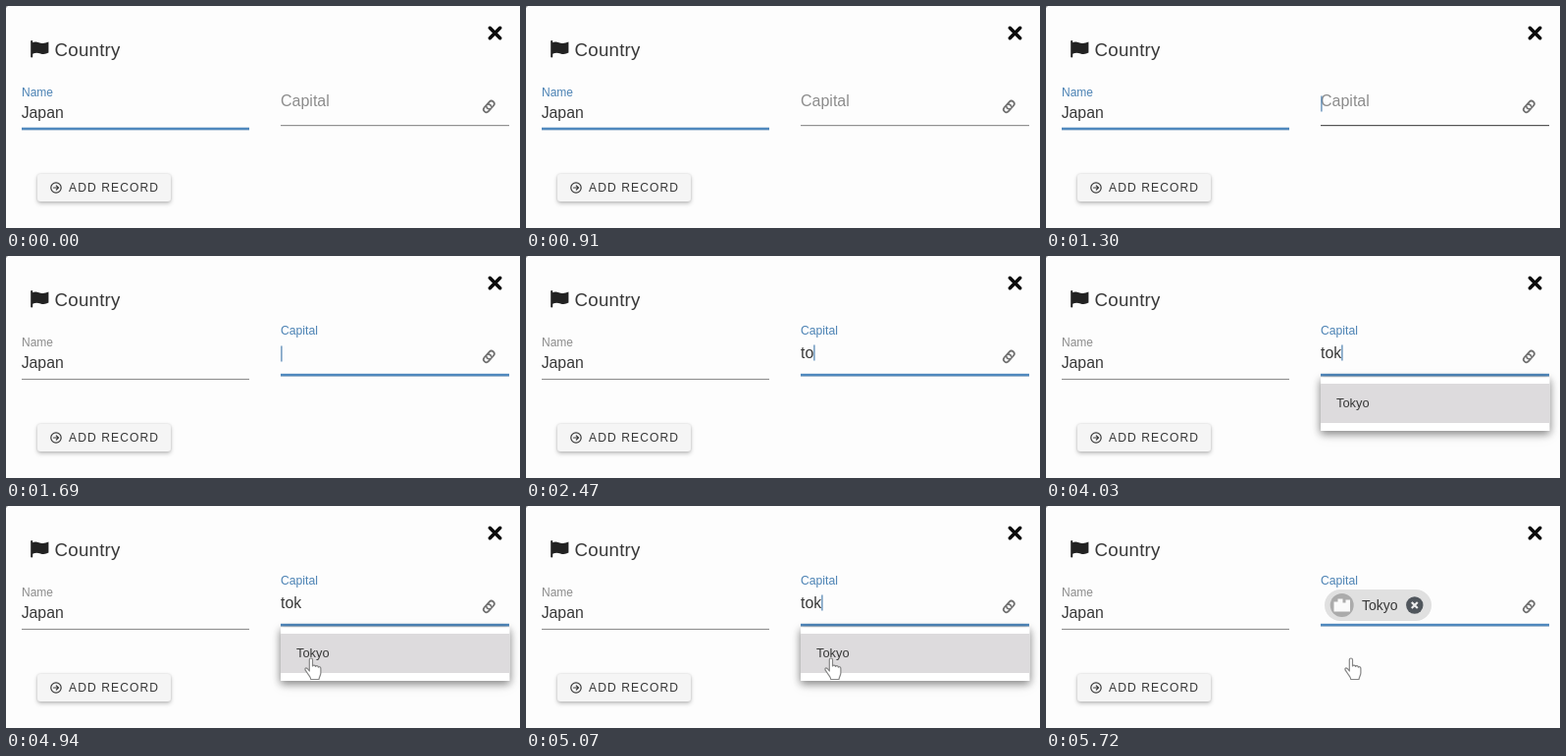
These frames come from a looping animation (524x226 px, 6.37 s). An HTML page:

```html
<!DOCTYPE html>
<html lang="en">
<head>
<meta charset="utf-8">
<title>Country form</title>
<style>
html, body { margin: 0; width: 100%; height: 100%; overflow: hidden; background: #fdfdfd; }
svg { display: block; width: 524px; height: 226px; font-family: "Liberation Sans", Arial, sans-serif; }
text { fill: #383838; white-space: pre; }
.soft { filter: blur(.4px); }
.button { filter: drop-shadow(0 2px 2px rgba(0, 0, 0, .24)) drop-shadow(0 0 1px rgba(0, 0, 0, .12)); }
.menu { filter: drop-shadow(0 3px 4px rgba(0, 0, 0, .4)) drop-shadow(0 2px 5px rgba(0, 0, 0, .15)); }
.line { fill: none; stroke-linecap: round; stroke-linejoin: round; }
</style>
</head>
<body>
<svg viewBox="0 0 524 226">
<g class="soft">
  <path d="M0 0h2l-2 2z" fill="#999"/>

  <path d="M493.3 22.3l10.4 10.4M503.7 22.3l-10.4 10.4" stroke="#0b0b0b" stroke-width="3.6" stroke-linecap="round"/>

  <path d="M26.2 36v15.5" class="line" stroke="#222" stroke-width="2"/>
  <path d="M27 37.3c4-2.4 7 .9 10.4 .6 2.2-.1 4-.8 6-1.5v11.2c-2.6 1.5-5.4 1.9-8.2 .9-3-1-5.200-1-8.200 .2z" fill="#222"/>
  <text x="49.5" y="50.8" font-size="18.7" letter-spacing=".25">Country</text>

  <text id="nameLabel" x="16" y="92" font-size="12">Name</text>
  <text x="15.7" y="113.6" font-size="15.8">Japan</text>
  <rect x="16" y="124.9" width="232" height="1.2" fill="#929292"/>
  <rect id="nameFocus" x="16" y="123.7" width="232" height="2.6" fill="#4f88bd"/>

  <text id="capitalLabel" font-size="16">Capital</text>
  <text id="typed" x="280" y="103.6" font-size="15.8"></text>
  <rect id="capitalLine" x="280" y="121" width="233" height="1.2"/>
  <rect id="capitalFocus" y="119.8" height="2.6" fill="#4f88bd"/>
  <g class="line" stroke="#707070" stroke-width="1.7" transform="translate(492.3 102.4) rotate(-48)">
    <path d="M-.8 2.900h-3a2.900 2.900 0 0 1 0-5.800h3.300a2.900 2.900 0 0 1 2.300 4.500"/>
    <path d="M.8-2.900h3a2.900 2.900 0 0 1 0 5.800h-3.300a2.900 2.900 0 0 1-2.300-4.500"/>
  </g>
  <rect id="caret" width="1.2" height="16" fill="#4a7fae"/>

  <rect class="button" x="32" y="171" width="136" height="28" rx="3" fill="#f5f5f5"/>
  <g class="line" stroke="#3a3a3a" stroke-width="1.2">
    <circle cx="51" cy="185" r="5.2"/>
    <path d="M48.5 185h4.8M51.3 182.800l2.200 2.200-2.200 2.200"/>
  </g>
  <text x="64" y="189.3" font-size="12.1" letter-spacing="1.08">ADD RECORD</text>

  <g id="menu">
    <rect class="menu" x="280" y="123.5" width="233.5" height="54.500" fill="#fff"/>
    <rect x="280" y="130" width="233.5" height="40" fill="#dddbdd"/>
    <text x="296" y="154.2" font-size="12.9">Tokyo</text>
  </g>

  <g id="chip">
    <rect x="284" y="85" width="109" height="32" rx="16" fill="#e0e0e0"/>
    <circle cx="301.7" cy="101" r="12" fill="#ababab"/>
    <path d="M293.5 107.500v-10h4v-3h5v4h3v-3h4.500v12z" fill="#fafafa"/>
    <text x="322" y="106" font-size="14">Tokyo</text>
    <circle cx="375.8" cy="101" r="8.7" fill="#50565c"/>
    <path d="M372.8 98l6 6M378.8 98l-6 6" stroke="#eee" stroke-width="2.2"/>
  </g>

  <path id="hand" class="line" stroke="#858585" stroke-width="1.2" style="fill:#fff"
    d="M-1.700 13V1.500C-1.700-.5 1.500-.5 1.500 1.500V8c.5-1.300 2.700-1.200 3 .4 .6-1.200 2.700-.9 2.900 .7 .7-1 2.500-.5 2.500 1.300V15c0 2.500-1.700 3.700-1.900 6.500H-.200c-.2-2.700-2.600-4.300-4.100-7.200-1.200-1.700-2.500-3-1.600-4 1.100-1.200 3 .6 4.200 2.700z"/>
</g>
</svg>
<script>
const LOOP = 6370;
const BLUE = "#4b82b4", GREY = "#8c8c8c";
const el = id => document.getElementById(id);

// Each step changes only the listed values: focus 0..1, typed text, caret [x, y], pointer [x, y].
const steps = [
  [0, { focus: 0, hover: false, typed: "", caret: null, menu: false, chip: false, pointer: null }],
  [260, { caret: [60, 101] }],
  [910, { caret: null }],
  [1170, { hover: true }],
  [1300, { caret: [280.3, 91.5] }],
  [1430, { focus: .8 }],
  [1560, { focus: .97 }],
  [1690, { focus: 1 }],
  [1950, { caret: null }],
  [2340, { typed: "t", caret: [285, 90.5] }],
  [2470, { typed: "to", caret: [293.3, 90.5] }],
  [2600, { menu: true }],
  [2860, { typed: "tok", caret: [301.3, 90.5] }],
  [3510, { caret: null }],
  [4030, { caret: [301.3, 90.5] }],
  [4550, { caret: null }],
  [4680, { pointer: [317, 141] }],
  [4810, { pointer: [313, 151] }],
  [4940, { pointer: [311, 155] }],
  [5070, { caret: [301.3, 90.5] }],
  [5200, { typed: "", caret: null, menu: false, chip: true }]
];

const mix = (a, b, p) => a + (b - a) * p;
const show = (id, on) => { el(id).style.display = on ? "" : "none"; };
const place = (id, pos) => {
  show(id, pos);
  if (pos) el(id).setAttribute("transform", `translate(${pos})`);
};

function render(time) {
  const s = Object.assign({}, ...steps.filter(([at]) => at <= time).map(([, change]) => change));
  const focused = s.focus > 0;

  el("nameLabel").style.fill = focused ? GREY : BLUE;
  el("nameFocus").style.opacity = focused ? 0 : 1;

  el("capitalLabel").style.fill = focused ? BLUE : GREY;
  el("capitalLabel").setAttribute("transform",
    `translate(280 ${mix(101.8, 80, s.focus)}) scale(${mix(1, .76, s.focus)})`);
  el("capitalLine").style.fill = s.hover ? "#555" : "#929292";
  el("capitalFocus").setAttribute("x", 396.5 - 116.5 * s.focus);
  el("capitalFocus").setAttribute("width", 233 * s.focus);

  el("typed").textContent = s.typed;
  show("menu", s.menu);
  show("chip", s.chip);
  place("caret", s.caret);
  place("hand", s.pointer);
}

const start = performance.now();
function tick() {
  render((performance.now() - start) % LOOP);
  requestAnimationFrame(tick);
}
tick();
</script>
</body>
</html>
```
